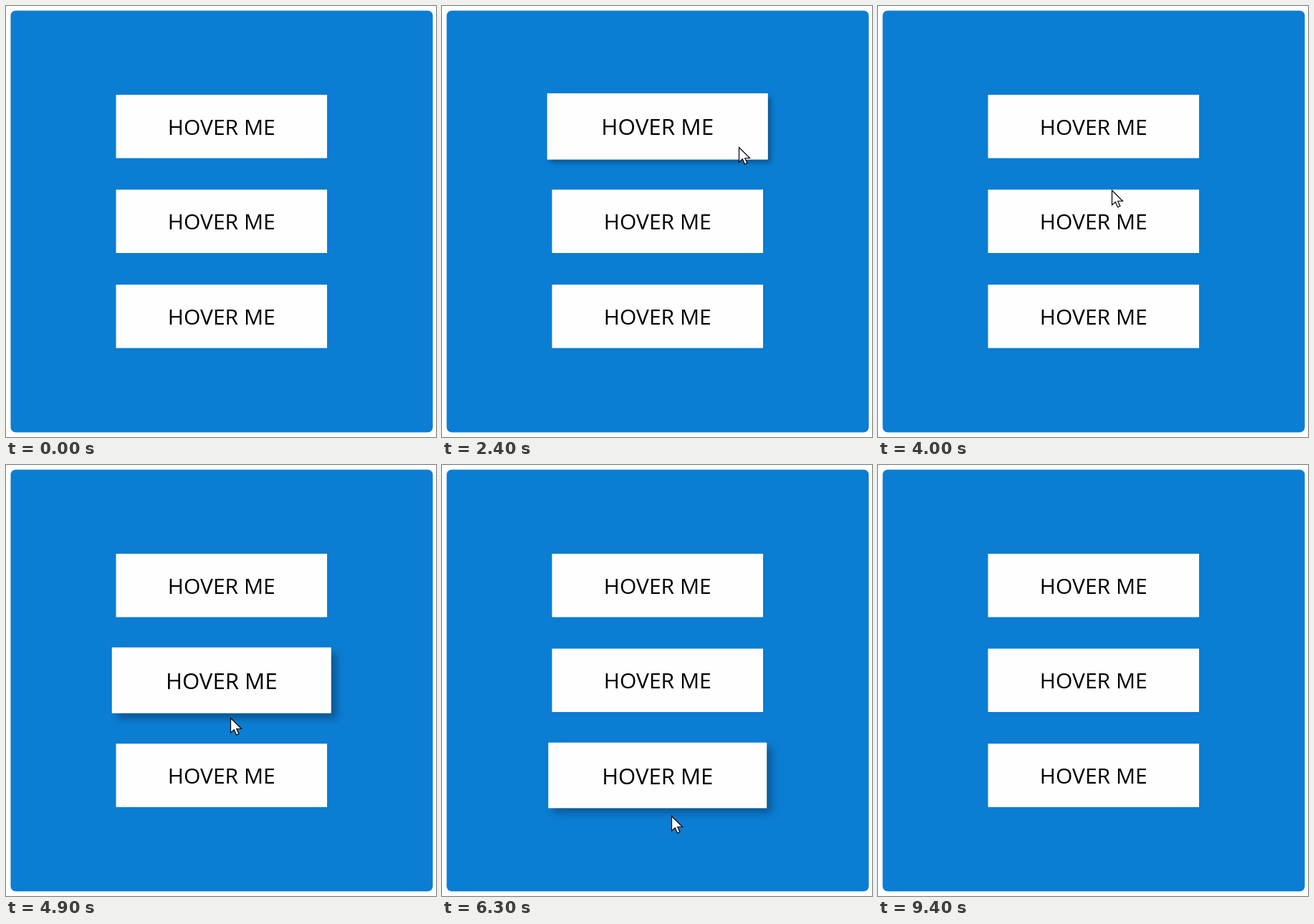
Write an HTML page with a canvas that moves like this. It is 600 px wide and 602 px high and loops after 9500 ms.

```html
<!DOCTYPE html>
<html lang="en">
<head>
<meta charset="utf-8">
<title>Hover buttons</title>
<style>
  html, body { margin: 0; width: 100%; height: 100%; overflow: hidden; background: #fff; }
  canvas { display: block; }
</style>
</head>
<body>
<canvas id="stage" width="600" height="602"></canvas>
<script>
const ctx = document.getElementById('stage').getContext('2d');
const LOOP = 9500, STEP = 100, FADE = 300;
const WIDTH = 294.5, HEIGHT = 88.5, CENTER_X = 300.75;

const buttons = [
  { y: 168.25, enter: 2200, leave: 3600, offset: 5, blur: 8 },
  { y: 300.75, enter: 4000, leave: 4850, offset: 10, blur: 12 },
  { y: 433.5, enter: 5270, leave: 6240, offset: 10, blur: 14 }
];

// Pointer path: time, x, y
const path = [
  [1300, 620, 270], [1700, 540, 255], [2000, 481, 232], [2300, 425, 202],
  [2700, 382, 182], [3200, 375, 181], [3600, 356, 213], [4000, 326, 257],
  [4400, 311, 301], [4850, 313, 347], [4900, 313, 353], [5270, 315, 390],
  [5700, 317, 434], [6240, 320, 482], [6300, 320, 490], [6650, 322, 527],
  [7000, 324, 562], [7100, 325, 588], [7200, 326, 620]
];

const mix = (a, b, p) => a + (b - a) * p;

// CSS "ease": cubic-bezier(.25, .1, .25, 1)
function ease(p) {
  if (p <= 0) return 0;
  if (p >= 1) return 1;
  const curve = (a, b, s) => 3 * a * s * (1 - s) ** 2 + 3 * b * s * s * (1 - s) + s ** 3;
  let low = 0, high = 1;
  for (let i = 0; i < 20; i++) {
    const mid = (low + high) / 2;
    if (curve(.25, .25, mid) < p) low = mid; else high = mid;
  }
  return curve(.1, 1, low);
}

function pointerAt(t) {
  const next = path.findIndex(point => point[0] > t);
  if (next < 1) return null;
  const a = path[next - 1], b = path[next];
  const p = (t - a[0]) / (b[0] - a[0]);
  return { x: mix(a[1], b[1], p), y: mix(a[2], b[2], p) };
}

function drawButton(button, t) {
  const { y, enter, leave, offset, blur } = button;
  const lift = ease((t - enter) / FADE) - ease((t - leave) / FADE);
  ctx.save();
  ctx.translate(CENTER_X, y);
  ctx.scale(1 + .05 * lift, 1 + .05 * lift);
  ctx.save();
  ctx.shadowColor = `rgba(0, 0, 0, ${.4 * lift})`;
  ctx.shadowOffsetX = ctx.shadowOffsetY = offset * lift;
  ctx.shadowBlur = blur * lift;
  ctx.fillStyle = '#fffeff';
  ctx.fillRect(-WIDTH / 2, -HEIGHT / 2, WIDTH, HEIGHT);
  ctx.restore();
  ctx.fillStyle = '#000';
  ctx.fillText('HOVER ME', 0, 11.6);
  ctx.restore();
}

function drawArrow() {
  ctx.beginPath();
  [[0, 0], [0, 20.5], [4.8, 16.2], [8, 23.5], [11.4, 22], [8.2, 15], [15, 15]]
    .forEach(([x, y]) => ctx.lineTo(x + .5, y + .5));
  ctx.closePath();
  ctx.fillStyle = '#fff';
  ctx.fill();
  ctx.lineWidth = 1.2;
  ctx.strokeStyle = '#000';
  ctx.stroke();
}

function drawTextCursor() {
  ctx.beginPath();
  for (const y of [-10.5, 10.5]) {
    ctx.moveTo(-6.5, y);
    ctx.lineTo(-1.5, y);
    ctx.moveTo(1.5, y);
    ctx.lineTo(6.5, y);
  }
  ctx.moveTo(0, -9.5);
  ctx.lineTo(0, 9.5);
  ctx.moveTo(-3, 4);
  ctx.lineTo(3, 4);
  for (const [color, width] of [['#fff', 3.6], ['#000', 1.5]]) {
    ctx.strokeStyle = color;
    ctx.lineWidth = width;
    ctx.stroke();
  }
}

function drawPointer(t) {
  const at = pointerAt(t);
  if (!at) return;
  const overText = Math.abs(at.x - CENTER_X) < 78 &&
    buttons.some(button => Math.abs(at.y - button.y) < 21);
  ctx.save();
  ctx.translate(Math.round(at.x), Math.round(at.y));
  if (overText) drawTextCursor(); else drawArrow();
  ctx.restore();
}

function draw(t) {
  ctx.fillStyle = '#fff';
  ctx.fillRect(0, 0, 600, 602);
  ctx.fillStyle = '#0b7dd2';
  ctx.beginPath();
  ctx.roundRect(6.5, 6.5, 589, 589, 7);
  ctx.fill();
  ctx.font = '30px "Open Sans", "Noto Sans", sans-serif';
  ctx.textAlign = 'center';
  buttons.forEach(button => drawButton(button, t));
  drawPointer(t);
}

const start = performance.now();
function frame() {
  const t = (performance.now() - start) % LOOP;
  draw(Math.floor(t / STEP) * STEP);
  requestAnimationFrame(frame);
}
frame();
</script>
</body>
</html>
```
